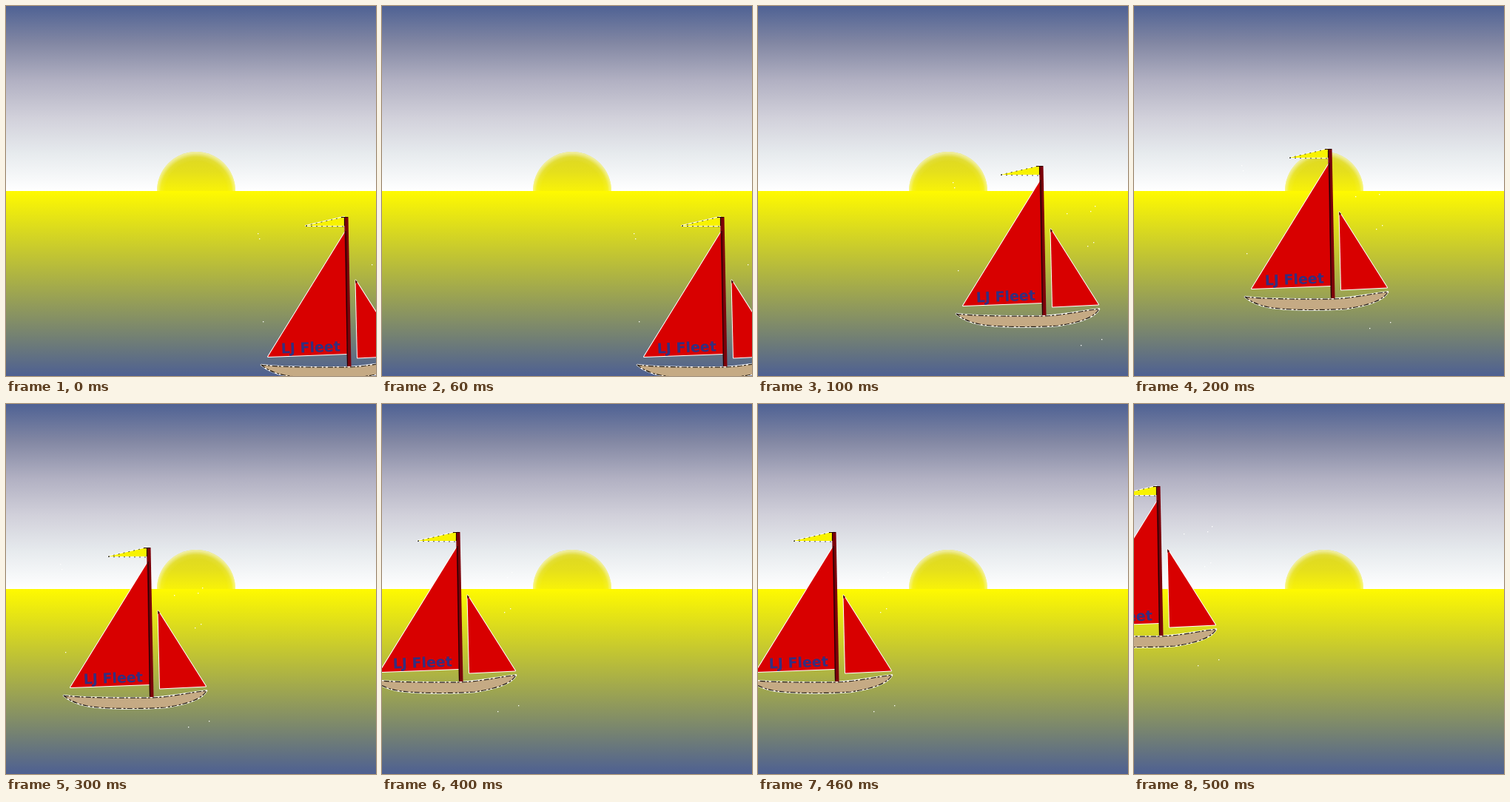
An HTML page with a canvas for the animation above (600 ms loop, 500 by 500 pixels).

```html
<!DOCTYPE html>
<html lang="en">
<head>
<meta charset="utf-8">
<title>Sailing boat at sunset</title>
<style>
html, body { margin: 0; width: 100%; height: 100%; overflow: hidden; }
canvas { display: block; }
</style>
</head>
<body>
<canvas id="stage" width="500" height="500"></canvas>
<script>
const ctx = document.getElementById('stage').getContext('2d');
const STEP = 100;
const HORIZON = 250;

// Boat offset for each step of the loop
const stops = [[77, 69], [0, 0], [-118, -23], [-190, -22], [-280, -43], [-350, -105]];

const specks = [[270, 357], [263, 238], [265, 245], [417, 280], [449, 277],
  [455, 270], [453, 319], [445, 324], [436, 458], [464, 450]];

function fade(gradient, colors) {
  colors.forEach((c, i) => gradient.addColorStop(i / (colors.length - 1), c));
  return gradient;
}

const sky = fade(ctx.createLinearGradient(0, 0, 0, HORIZON),
  ['#4f6294', '#8287a3', '#b1b0c2', '#d1d0da', '#e7ebee', '#ffffff']);
const sea = fade(ctx.createLinearGradient(0, HORIZON, 0, 500), ['#fffa00', '#4e6092']);
const sun = fade(ctx.createLinearGradient(0, 197, 0, HORIZON), ['#dcd625', '#e5df1c', '#f8f208']);
const halo = ctx.createRadialGradient(257, 252, 42, 257, 252, 54);
halo.addColorStop(0, 'rgba(250,250,225,0)');
halo.addColorStop(0.5, 'rgba(250,250,225,0.1)');
halo.addColorStop(1, 'rgba(250,250,225,0.65)');

function shape(points, fill, edge, width = 1) {
  ctx.beginPath();
  points.forEach(p => ctx.lineTo(p[0], p[1]));
  ctx.closePath();
  if (edge) {
    ctx.strokeStyle = edge;
    ctx.lineWidth = width;
    ctx.stroke();
  }
  ctx.fillStyle = fill;
  ctx.fill();
}

function line(path, color, width, dash = []) {
  ctx.setLineDash(dash);
  ctx.strokeStyle = color;
  ctx.lineWidth = width;
  ctx.stroke(path);
  ctx.setLineDash([]);
}

const hull = new Path2D(
  'M268 416 C290 419 340 419.5 386 419 C415 418 436 412 461 409.5 ' +
  'C455 421 433 428 405 432 C370 434.5 320 434 300 430 C285 427 275 422 268 416Z');
const flagEdge = new Path2D('M328 228 L380 216 M328 228.5 L380 229');

function drawScene() {
  ctx.fillStyle = sky;
  ctx.fillRect(0, 0, 500, HORIZON);
  ctx.fillStyle = sea;
  ctx.fillRect(0, HORIZON, 500, 250);
  ctx.beginPath();
  ctx.ellipse(257, HORIZON, 53, 53, 0, Math.PI, 0);
  ctx.fillStyle = sun;
  ctx.fill();
  ctx.fillStyle = halo;
  ctx.fill();
}

function drawBoat() {
  ctx.lineJoin = 'round';
  shape([[382, 235], [277, 405], [384, 401]], '#d80000', '#fff', 2);
  shape([[395.5, 301.5], [460, 403.5], [398, 406.5]], '#d80000', '#fff', 2);
  shape([[395, 301], [398, 304], [395.5, 306]], '#400000');

  line(hull, '#fff', 2.5);
  ctx.fillStyle = '#c5aa84';
  ctx.fill(hull);
  line(hull, '#241c14', 1.2, [7, 2, 3, 3]);

  shape([[328, 228], [380, 216], [380, 228]], '#f8f200', '#fff', 2);
  line(flagEdge, '#222', 0.8, [2, 5]);
  shape([[380, 229], [383, 230], [383, 235], [380, 234]], '#fff');
  shape([[380, 216], [385.5, 216], [389.5, 418], [384, 418]], '#7c0009');
  line(new Path2D('M376 216.5 H385 M380.5 217 V228 M382 235 L384.5 417'), '#240004', 1.2);

  ctx.save();
  ctx.translate(295, 400.5);
  ctx.rotate(-0.04);
  ctx.font = 'bold 19px "DejaVu Sans", sans-serif';
  ctx.fillStyle = '#322f80';
  ctx.fillText('LJ Fleet', 0, 0);
  ctx.restore();

  ctx.fillStyle = '#fff';
  specks.forEach(([x, y]) => ctx.fillRect(x, y, 1.3, 1.3));
}

function render(now) {
  const [dx, dy] = stops[Math.floor(now / STEP) % stops.length];
  drawScene();
  ctx.save();
  ctx.translate(dx, dy);
  drawBoat();
  ctx.restore();
}

let start;
function tick(now) {
  start ??= now;
  render(Math.max(0, now - start));
  requestAnimationFrame(tick);
}
render(0);
requestAnimationFrame(tick);
</script>
</body>
</html>
```
